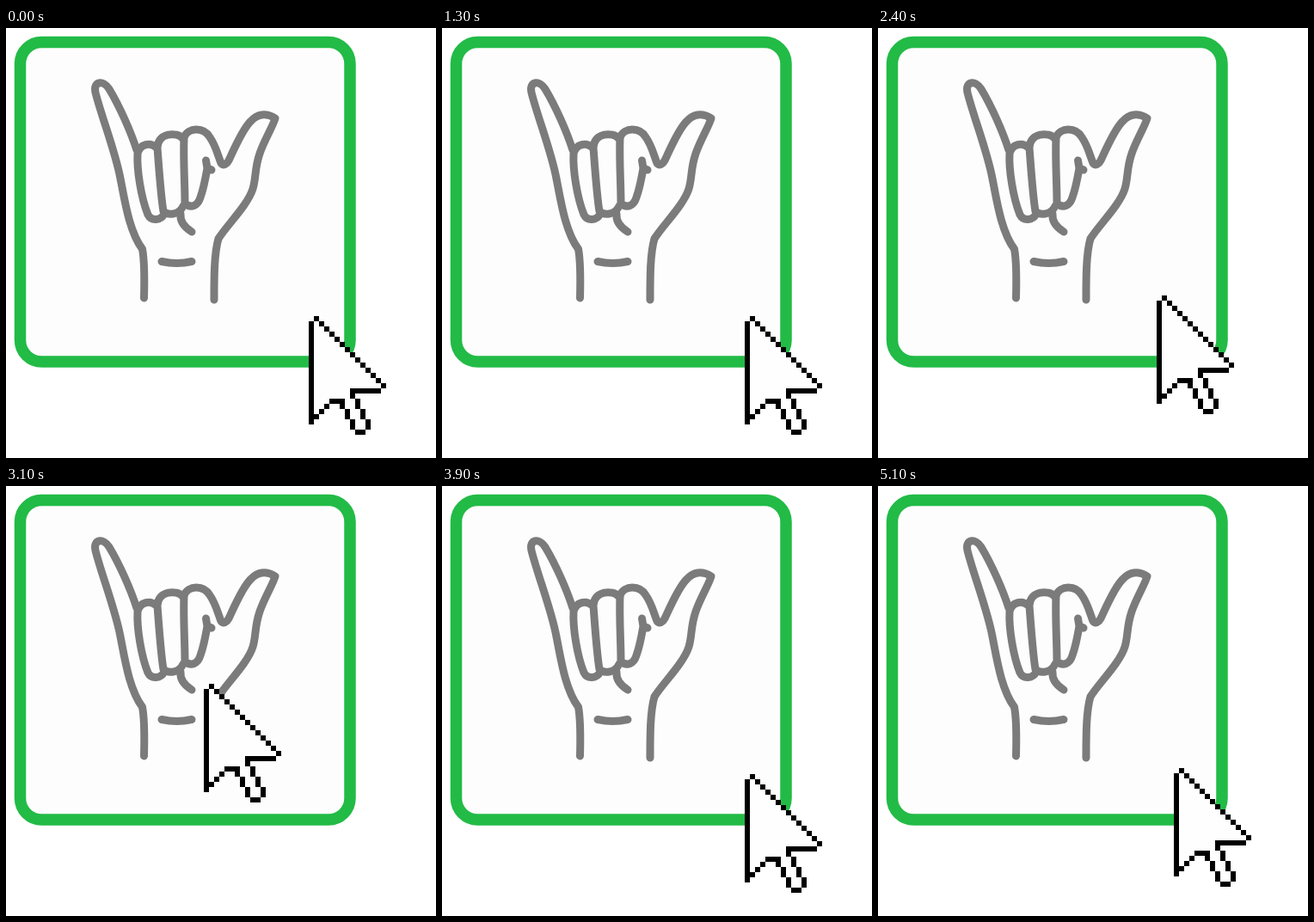
These frames come from a looping animation (500x500 px, 5210 ms). An HTML page:

```html
<!DOCTYPE html>
<html lang="en">
<head>
<meta charset="utf-8">
<title>Shaka and cursor</title>
<style>
  html, body { margin: 0; width: 100%; height: 100%; overflow: hidden; background: #fff; }
  svg { display: block; width: 500px; height: 500px; }
  .hand { fill: none; stroke: #7b7b7b; stroke-width: 9; stroke-linecap: round; stroke-linejoin: round; }
</style>
</head>
<body>
<svg viewBox="0 0 500 500">
  <rect x="16.5" y="16.5" width="383.5" height="371.5" rx="25" fill="#fdfdfd" stroke="#22bb46" stroke-width="13.5"/>
  <g class="hand">
    <!-- pinky and left wrist -->
    <path d="M160.5 314C161 295 161 270 158.5 257C143 236 138 200 133 175C127 143 111 103 104 75C101 62 113 60 120 71C132 91 145 120 152 142"/>
    <!-- folded fingers -->
    <path d="M175 139C168 133 156 134 153 146C152 165 157 197 165 217C169 225 180 224 184 216"/>
    <path d="M205 128C199 121 177 121 176 139C178 165 180 195 183 213C188 218 201 218 206 207"/>
    <path d="M207 127C206 155 208 180 208 204C215 210 223 207 226 197C230 186 232 175 234 163L232.500 154M234 163L239 165"/>
    <!-- knuckle, thumb and right wrist -->
    <path d="M207 127C212 115 230 115 237 127C244 137 246 147 250 157C253 161 257 158 259 154C266 139 275 118 284 109C292 100 302 98 313 105C311 113 300 131 295 146C289 163 291 174 287 187C281 206 257 229 247 245C242 262 242 290 242 316"/>
    <!-- creases -->
    <path d="M203 216C202 225 208 232 216 237"/>
    <path d="M181 271.500C192 274 205 274 216 271.500"/>
  </g>
  <g id="cursor" shape-rendering="crispEdges">
    <g transform="translate(352 335) scale(6)">
      <path fill="#fefefe" d="M1 1L2 1L14 13V14H8V16H9V18H10V20H11V22H9V20H8V18H7V16H4L1 19Z"/>
      <path id="outline"/>
    </g>
  </g>
</svg>
<script>
  const cell = (x, y, w = 1, h = 1) => `M${x} ${y}h${w}v${h}h${-w}z`;

  // Pixel outline of the arrow, in grid cells
  const cells = [cell(0, 1, 1, 20), cell(8, 14, 6), cell(4, 16, 3), cell(9, 22, 2)];
  for (let i = 0; i < 14; i++) cells.push(cell(i + 1, i));
  for (let i = 1; i < 4; i++) cells.push(cell(i, 20 - i));
  for (let i = 0; i < 4; i++) cells.push(cell(8 + i, 14 + 2 * i, 1, 2));
  for (let i = 0; i < 3; i++) cells.push(cell(6 + i, 16 + 2 * i, 1, 2));
  document.getElementById('outline').setAttribute('d', cells.join(''));

  // Distance travelled up and left at each step of one sweep
  const sweep = [0, 32, 60, 84, 105, 122, 134, 134, 110, 80, 52, 28, 8];
  const STEP = 100, LOOP = 5210, SLOPE = 0.86;

  const frames = Array.from({ length: 4 * sweep.length }, (_, i) => {
    const d = sweep[i % sweep.length];
    return {
      offset: i * STEP / LOOP,
      easing: 'steps(1, end)',
      transform: `translate(${-d}px, ${-Math.round(d * SLOPE)}px)`
    };
  });
  frames.push({ ...frames[frames.length - 1], offset: 1 });

  document.getElementById('cursor').animate(frames, { duration: LOOP, iterations: Infinity });
</script>
</body>
</html>
```
